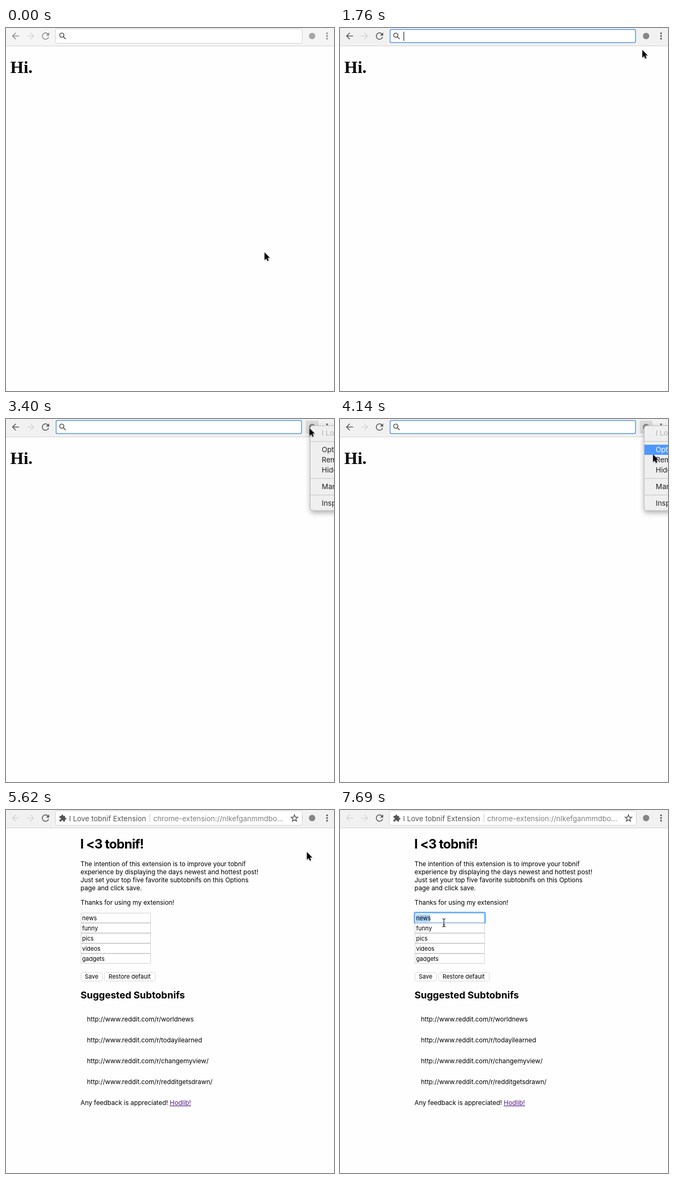
An HTML page that plays this animation: 614x678 px, repeating every 7.99 s.

```html
<!DOCTYPE html>
<html lang="en">
<head>
<meta charset="utf-8">
<title>Extension options</title>
<style>
  html, body { margin: 0; width: 100%; height: 100%; overflow: hidden; background: #fefefe; }
  svg { display: block; font-family: Inter, "Open Sans", sans-serif; }
  .line { fill: none; stroke: currentColor; stroke-width: 1.7; }
  .body { font-size: 11.9px; }
  .small { font-size: 11px; }
  .bar { font-size: 13.45px; }
  .menu { font-size: 13.5px; fill: #222; }
  #menu > rect:first-child { filter: drop-shadow(0 4px 5px rgba(0, 0, 0, .3)); }
  #arrow { filter: drop-shadow(0 1px 1px rgba(0, 0, 0, .35)); }
</style>
</head>
<body>
<svg width="614" height="678" viewBox="0 0 614 678" xmlns="http://www.w3.org/2000/svg">
  <rect width="614" height="678" fill="#fefefe"/>
  <text id="greeting" x="8" y="84" font-family="'Liberation Serif', Times, serif" font-size="32" font-weight="700">Hi.</text>

  <g id="options">
    <text x="139" y="72" font-size="24" font-weight="700" letter-spacing="-.03em">I &lt;3 tobnif!</text>
    <g id="intro" class="body"></g>
    <g id="fields" class="small"></g>
    <g id="buttons" class="small"></g>
    <text x="139.5" y="352" font-size="18" font-weight="700">Suggested Subtobnifs</text>
    <g id="links" class="body"></g>
    <text class="body" x="139.5" y="551">Any feedback is appreciated! <tspan fill="#551a8b" text-decoration="underline">Hodlib!</tspan></text>
  </g>

  <g id="toolbar">
    <rect id="strip" width="614" height="33"/>
    <path d="M0 33.5H614" stroke="#d2d2d2"/>
    <path id="back" class="line" d="M24.5 15H12.5M18.3 9l-6 6 6 6"/>
    <path class="line" color="#d6d6d6" d="M39.5 15h12M45.7 9l6 6-6 6"/>
    <path id="reload" fill="currentColor" transform="translate(74 15) scale(.85) translate(-12 -12)"
      d="M17.65 6.35A7.96 7.96 0 0 0 12 4a8 8 0 1 0 7.73 10h-2.08A6 6 0 1 1 12 6c1.66 0 3.14.69 4.22 1.78L13 11h7V4z"/>
    <path id="stop" class="line" d="M68.5 9.5l11 11M79.5 9.5l-11 11"/>
    <rect id="box" fill="#fff"/>
    <g id="search" class="line" color="#5a5a5a"><circle cx="104.4" cy="13.4" r="3.9"/><path d="M107.2 16.2l4.4 4.4"/></g>
    <path id="caret" d="M119.5 7V24" stroke="#000"/>
    <g id="address" class="bar" fill="#555">
      <path transform="translate(106 15) scale(.62) translate(-11.5 -11.5)"
        d="M20.5 11H19V7c0-1.1-.9-2-2-2h-4V3.5a2.5 2.5 0 0 0-5 0V5H4a2 2 0 0 0-2 2v3.8h1.5a2.7 2.7 0 0 1 0 5.4H2V20a2 2 0 0 0 2 2h3.8v-1.5a2.7 2.7 0 0 1 5.4 0V22H17a2 2 0 0 0 2-2v-4h1.5a2.5 2.5 0 0 0 0-5z"/>
      <text x="118" y="20.5">I Love tobnif Extension</text>
      <path d="M269.5 7V23" stroke="#c8c8c8"/>
      <text x="275.5" y="20.5" fill="#808080">chrome-extension://nlkefganmmdbo...</text>
      <path id="star" fill="none" stroke="#555" stroke-width="1.4"/>
    </g>
    <rect id="pressed" x="561" y="3" width="24" height="24" rx="2" fill="#dadada"/>
    <circle id="badge" cx="573" cy="15" r="6"/>
    <g id="kebab" fill="currentColor"><circle cx="601" cy="10" r="1.7"/><circle cx="601" cy="15" r="1.7"/><circle cx="601" cy="20" r="1.7"/></g>
  </g>

  <g id="menu">
    <rect x="569.5" y="12.5" width="220" height="158.5" rx="5" fill="#efefef" stroke="#bdbdbd"/>
    <path d="M570 42H614M570 111H614M570 142H614" stroke="#d8d8d8" stroke-width="2"/>
    <rect id="highlight" x="570" y="48" width="44" height="19" fill="#4f98fe"/>
    <g id="items" class="menu"></g>
  </g>

  <g id="pointer">
    <path id="arrow" d="M0 0V14.2L3.2 11.2L5.4 16L7.8 15L5.6 10.3H10Z" stroke="#fff" stroke-width="1" paint-order="stroke"/>
    <g id="beam" fill="none">
      <path d="M-3-7.5Q0-7.5 0-5.5Q0-7.5 3-7.5M0-5.5V5.5M-3 7.5Q0 7.5 0 5.5Q0 7.5 3 7.5M-2 3.5H2" stroke="#fff" stroke-width="2.6" opacity=".7"/>
      <path d="M-3-7.5Q0-7.5 0-5.5Q0-7.5 3-7.5M0-5.5V5.5M-3 7.5Q0 7.5 0 5.5Q0 7.5 3 7.5M-2 3.5H2" stroke="#111" stroke-width="1.1"/>
    </g>
  </g>
</svg>
<script>
const LOOP = 7990;
const el = id => document.getElementById(id);
const show = (id, on) => el(id).setAttribute('visibility', on ? 'visible' : 'hidden');
const set = (id, attrs) => Object.entries(attrs).forEach(([k, v]) => el(id).setAttribute(k, v));

function add(parent, tag, attrs, text = '') {
  const node = document.createElementNS('http://www.w3.org/2000/svg', tag);
  for (const k in attrs) node.setAttribute(k, attrs[k]);
  node.textContent = text;
  el(parent).append(node);
  return node;
}

[
  [105, 'The intention of this extension is to improve your tobnif'],
  [120, 'experience by displaying the days newest and hottest post!'],
  [135, 'Just set your top five favorite subtobnifs on this Options'],
  [150, 'page and click save.'],
  [177, 'Thanks for using my extension!']
].forEach(([y, s]) => add('intro', 'text', { x: 139.5, y }, s));

['news', 'funny', 'pics', 'videos', 'gadgets'].forEach((s, i) => {
  const y = 192.5 + 19 * i;
  add('fields', 'rect', { x: 140.5, y, width: 130, height: 18, fill: '#fff', stroke: '#d0d0d0' });
  if (!i) {
    add('fields', 'rect', { id: 'glow', x: 139.5, y: 191.5, width: 132, height: 20, rx: 2, fill: '#fff', stroke: '#6fb3f8', 'stroke-width': 3 });
    add('fields', 'rect', { id: 'selection', x: 142, y: 195, width: 27, height: 14, fill: '#a8d0f8' });
  }
  add('fields', 'text', { x: 142.5, y: y + 13.5 }, s);
});

[[140.5, 40, 'Save', 147.5], [184.5, 95, 'Restore default', 192]].forEach(([x, width, s, tx]) => {
  add('buttons', 'rect', { x, y: 303.5, width, height: 16, rx: 3.5, fill: '#fff', stroke: '#d9d9d9' });
  add('buttons', 'text', { x: tx, y: 315 }, s);
});

['worldnews', 'todayilearned', 'changemyview/', 'redditgetsdrawn/'].forEach((s, i) =>
  add('links', 'text', { x: 151.5, y: 395 + 39 * i }, 'http://www.reddit.com/r/' + s));

[[31, 'I Love tobnif Extension'], [62, 'Options'], [81, 'Remove'], [100, 'Hide'], [131, 'Manage'], [162, 'Inspect']]
  .forEach(([y, s], i) => {
    const item = add('items', 'text', { x: 591, y }, s);
    if (!i) item.setAttribute('fill', '#b4b4b4');
    if (i === 1) item.id = 'choice';
  });

const starPoints = Array.from({ length: 10 }, (_, i) => {
  const r = i % 2 ? 2.8 : 6.6, a = Math.PI * (i / 5 - .5);
  return (540 + r * Math.cos(a)).toFixed(2) + ' ' + (15.5 + r * Math.sin(a)).toFixed(2);
});
set('star', { d: 'M' + starPoints.join('L') + 'Z' });

// Pointer moves: first step, last step, step count, destination
const moves = [
  [150, 440, 3, 540, 190],
  [730, 1030, 3, 552, 117],
  [1320, 1760, 4, 566, 41],
  [1910, 2360, 4, 568, 17],
  [3550, 4140, 5, 586, 66],
  [5620, 6500, 7, 177, 292],
  [6640, 6640, 1, 190, 285],
  [6790, 7240, 4, 194.5, 210.5]
];

function pointerAt(t) {
  let x = 484, y = 419;
  for (const [first, last, count, toX, toY] of moves) {
    if (t < first) break;
    const gap = (last - first) / (count - 1) || 1;
    const p = Math.min(1, (1 + Math.floor((t - first) / gap + .001)) / count);
    const e = p * p * (3 - 2 * p);
    x += (toX - x) * e;
    y += (toY - y) * e;
  }
  return [x, y];
}

const within = (t, a, b) => t >= a && t < b;

function render(t) {
  const focused = t >= 1470, newTab = t >= 4890, loaded = t >= 5320;
  const editing = focused && !newTab;
  const [x, y] = pointerAt(t);
  const ink = focused ? '#5a5a5a' : '#8e8e8e';

  show('greeting', !newTab);
  show('options', loaded);
  set('strip', { fill: focused ? '#f1f1f1' : '#f5f5f5' });
  set('back', { color: newTab ? '#d6d6d6' : ink });
  ['reload', 'stop', 'kebab'].forEach(id => set(id, { color: ink }));
  show('reload', !newTab || loaded);
  show('stop', newTab && !loaded);
  set('box', editing
    ? { x: 93.75, y: 2.75, width: 459.5, height: 24.5, rx: 2.5, stroke: '#5796de', 'stroke-width': 1.5 }
    : { x: 92.5, y: 1.5, width: 462, height: 27, rx: 3, stroke: '#d0d0d0', 'stroke-width': 1 });
  show('search', !newTab);
  show('address', newTab);
  show('caret', within(t, 1470, 1910) || within(t, 2360, 2960));

  const menuOpen = within(t, 3400, 4740);
  const chosen = menuOpen && y >= 48;
  show('pressed', within(t, 2360, 4740));
  set('badge', { fill: focused ? '#858585' : '#a6a6a6' });
  show('menu', menuOpen);
  show('highlight', chosen);
  set('choice', { fill: chosen ? '#fff' : '#222' });

  show('glow', loaded && t >= 7540);
  show('selection', loaded && t >= 7690);

  const overField = t >= 6640;
  show('arrow', !overField);
  show('beam', overField);
  set('pointer', { transform: `translate(${x.toFixed(1)} ${y.toFixed(1)})` });
}

const start = performance.now();
function tick() {
  render((performance.now() - start) % LOOP);
  requestAnimationFrame(tick);
}
tick();
</script>
</body>
</html>
```
